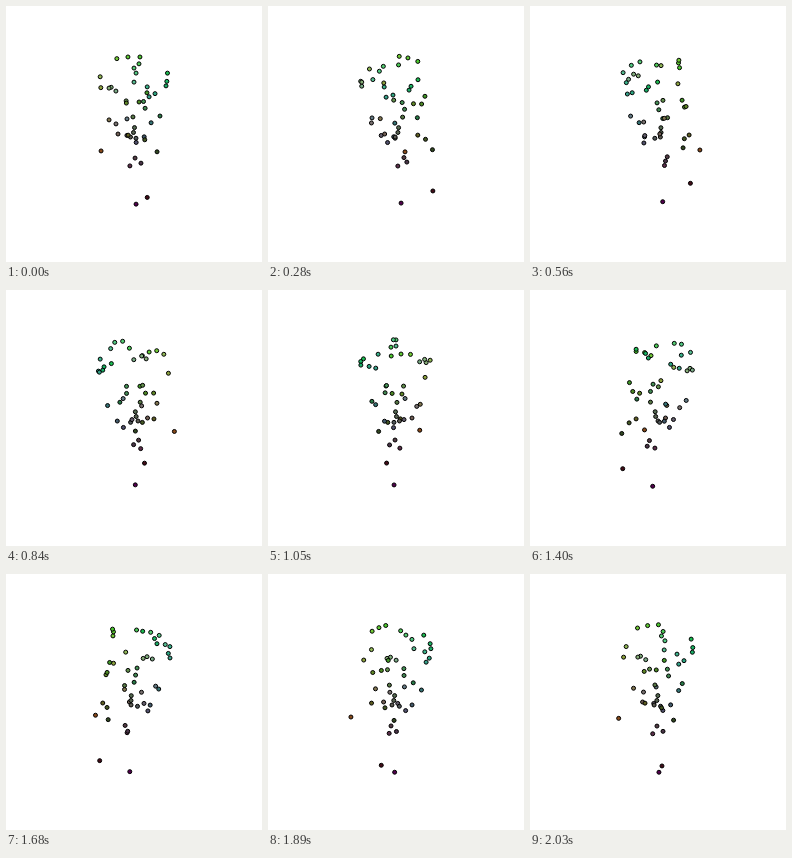
Animation, 256 px wide and 256 px high, one loop 2.1 s. Source, as an HTML page:

```html
<!DOCTYPE html>
<html lang="en">
<head>
<meta charset="utf-8">
<title>Rotating point cloud</title>
<style>
  html, body { margin: 0; width: 100%; height: 100%; overflow: hidden; background: #fff; }
  svg { display: block; width: 100%; height: 100%; }
  circle { stroke: #000; stroke-width: 1; }
</style>
</head>
<body>
<svg id="stage" viewBox="0 0 256 256"></svg>
<script>
const LOOP = 2100, STEP = 70, CENTER = 128, CAMERA = 213;

// x (right), h (up), z (towards the viewer), measured from the centre of the stage
const points = [
  [-15.7, 69, 18], [-5.5, 69.9, 19.7], [5.3, 68.7, 23], [5, 70.5, -1],
  [0, 71.5, -18], [2.3, 68.5, -26.5], [0, 60.3, -34.5], [-34, 57.5, -1],
  [-31, 43.3, 14], [-27.3, 50.2, -20], [-25.4, 52, -24], [-20.5, 48.7, -28.5],
  [33, 60, 3], [34, 54.5, -7.5], [33.5, 50.4, -10], [15.2, 54.2, -32],
  [11.3, 36, 27], [23.6, 45.3, -26], [17.3, 42.6, -31], [-7.7, 32.5, 4],
  [-6.7, 27, 27], [4.4, 27.8, 28], [9.5, 32.5, 0], [11, 25.5, 2],
  [25, 17.3, 8], [18.6, 12.2, -18.5], [-1, 16.3, 9.5], [-7.9, 17, -27],
  [-24.6, 13.9, 3], [-19.3, 10.8, -15], [0.5, 6.3, 3], [-0.5, 1.5, 3],
  [-16, 0, 0], [-7.5, -1.5, -13.5], [-3.5, -3, 2], [2, -4.3, -3],
  [2.3, -9, -14], [10.8, -3, -13], [9.3, -5, 29], [-5, -1, 30.5],
  [19.8, -15.3, 30], [-27.6, -14.2, 34.5], [1, -23, 9.5], [6.7, -28, 8.5],
  [-4, -31, 6], [11, -52.7, 36], [2, -68.5, 5]
];

const stage = document.getElementById("stage");

function colorOf([x, h, z]) {
  return `rgb(${[85 - 1.8 * x, 95 + 1.55 * h, 85 - 1.7 * z].map(c => Math.max(0, Math.round(c)))})`;
}

const dots = points.map(() => {
  const dot = document.createElementNS("http://www.w3.org/2000/svg", "circle");
  dot.setAttribute("r", 2);
  return stage.appendChild(dot);
});

function project(point, angle) {
  const [x, h, z] = point;
  const sin = Math.sin(angle), cos = Math.cos(angle);
  const depth = z * cos - x * sin;
  const scale = CAMERA / (CAMERA - depth);
  return {
    depth,
    cx: CENTER + (x * cos + z * sin) * scale,
    cy: CENTER - h * scale,
    fill: colorOf(point)
  };
}

function draw(time) {
  const angle = Math.floor((time % LOOP) / STEP) * STEP / LOOP * 2 * Math.PI;
  points.map(point => project(point, angle))
    .sort((a, b) => a.depth - b.depth)
    .forEach(({ cx, cy, fill }, i) => {
      dots[i].setAttribute("cx", cx.toFixed(2));
      dots[i].setAttribute("cy", cy.toFixed(2));
      dots[i].setAttribute("fill", fill);
    });
}

let start;
function tick(now) {
  start ??= now;
  draw(now - start);
  requestAnimationFrame(tick);
}
draw(0);
requestAnimationFrame(tick);
</script>
</body>
</html>
```
